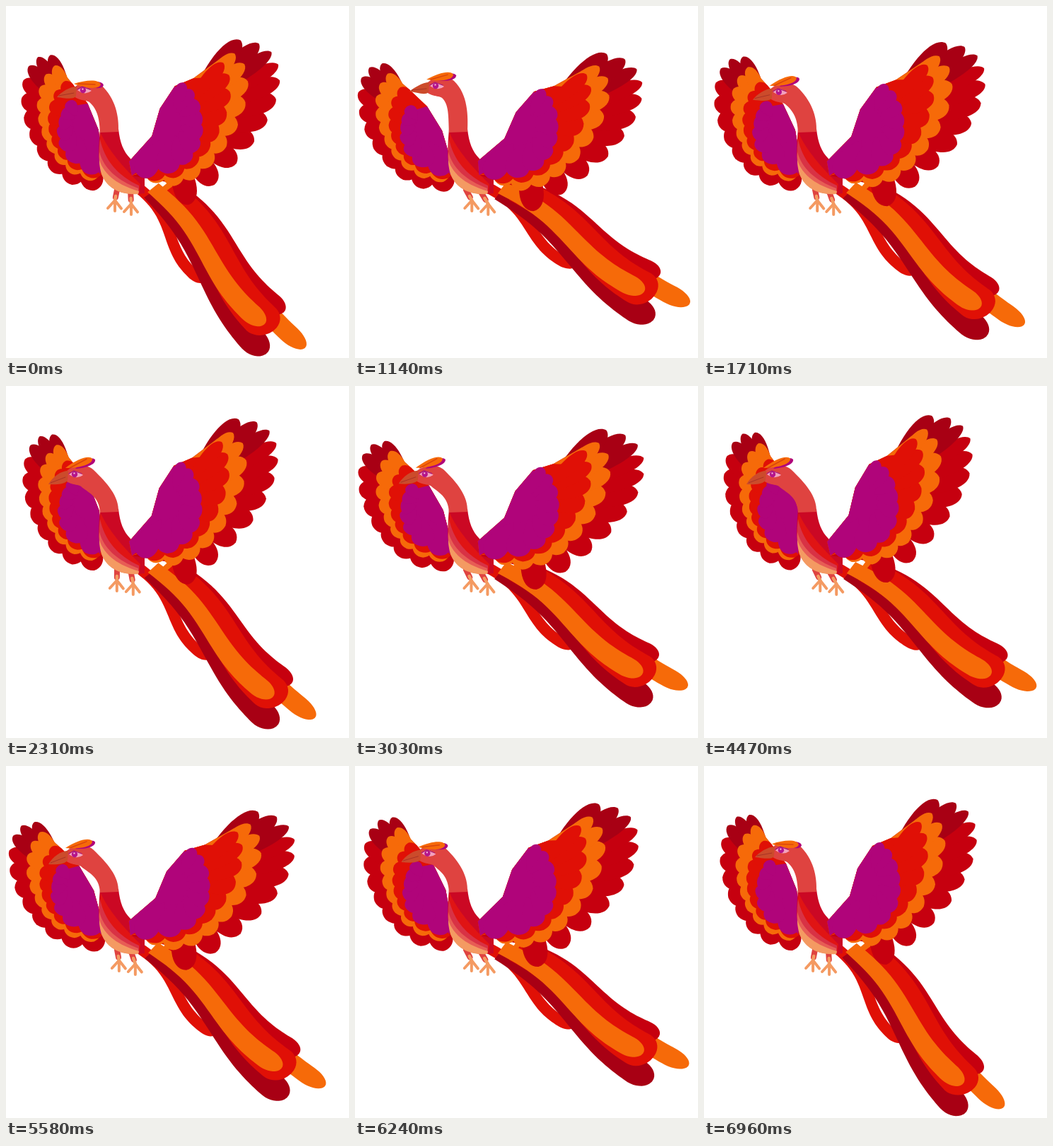
An HTML page with a canvas that plays this animation: 485 px wide and 498 px high, repeating every 6.99 s.

```html
<!DOCTYPE html>
<html lang="en">
<head>
<meta charset="utf-8">
<title>Firebird</title>
<style>
html, body { margin: 0; width: 100%; height: 100%; overflow: hidden; background: #fff; }
canvas { display: block; }
</style>
</head>
<body>
<canvas id="stage" width="485" height="498"></canvas>
<script>
const ctx = document.getElementById('stage').getContext('2d');
const LOOP = 6990, STEP = 30, TAU = Math.PI * 2;
const DARK = '#a80014', CRIMSON = '#c6000f', RED = '#e01006', ORANGE = '#f66a09', MAGENTA = '#b0047a';
const CORAL = '#df4340', PEACH = '#f49a62';

// Turning points of [time, value]; the bird eases from one to the next
const swingKeys = [[0, 56], [1140, 41], [2200, 53], [2890, 41], [3720, 57], [4550, 42], [5000, 52], [6450, 41]];
const nodKeys = [[0, .7], [1140, 1], [2310, 0], [3720, .2], [4470, 0], [5580, 0]];

function ease(keys, t) {
  const i = keys.findLastIndex(k => k[0] <= t);
  const [t0, a] = keys[i];
  const [t1, b] = keys[i + 1] || [LOOP, keys[0][1]];
  return a + (b - a) * (1 - Math.cos(Math.PI * (t - t0) / (t1 - t0))) / 2;
}

// Wing spread: about 0 raised, 1 lowered; three beats with a slow drift
function spread(t) {
  const wave = (beats, peak) => Math.cos(TAU * beats * (t - peak) / LOOP);
  return .35 + .5 * wave(3, 950) + .14 * wave(1, 900);
}

const mix = (a, b, s) => [a[0] + (b[0] - a[0]) * s, a[1] + (b[1] - a[1]) * s];

function bezier([a, b, c, d], s) {
  const ab = mix(a, b, s), bc = mix(b, c, s), cd = mix(c, d, s);
  return mix(mix(ab, bc, s), mix(bc, cd, s), s);
}

function shape(color, path) {
  ctx.fillStyle = color;
  ctx.fill(new Path2D(path));
}

function polygon(points, color) {
  ctx.beginPath();
  points.forEach(p => ctx.lineTo(p[0], p[1]));
  ctx.fillStyle = color;
  ctx.fill();
}

function line(color, width, ...points) {
  ctx.strokeStyle = color;
  ctx.lineWidth = width;
  ctx.beginPath();
  points.forEach(p => ctx.lineTo(p[0], p[1]));
  ctx.stroke();
}

function petal(root, tip, w, color) {
  const dx = tip[0] - root[0], dy = tip[1] - root[1], len = Math.hypot(dx, dy);
  const nx = -dy / len * w, ny = dx / len * w;
  const [mx, my] = mix(root, tip, .5), [ex, ey] = mix(root, tip, .96);
  ctx.beginPath();
  ctx.moveTo(root[0], root[1]);
  ctx.bezierCurveTo(mx + nx, my + ny, ex + nx, ey + ny, tip[0], tip[1]);
  ctx.bezierCurveTo(ex - nx, ey - ny, mx - nx, my - ny, root[0], root[1]);
  ctx.fillStyle = color;
  ctx.fill();
}

// Each layer: colour, feather count, leading-edge points used, curve along the feather tips
const rightWing = {
  pivot: [180, 220], mid: [232, 165], turn: .135,
  lead: [[178, 240], [174, 220], [206, 184], [217, 145], [238, 113], [264, 102], [300, 75]],
  layers: [
    [CRIMSON, 11, 7, [[330, 48], [430, 50], [388, 190], [258, 281]]],
    [ORANGE, 10, 7, [[322, 67], [378, 95], [297, 288], [208, 250]]],
    [RED, 9, 6, [[306, 80], [336, 114], [295, 254], [205, 247]]],
    [MAGENTA, 9, 5, [[250, 108], [284, 123], [308, 243], [190, 242]]]
  ]
};
const leftWing = {
  pivot: [135, 225], mid: [105, 165], turn: -.165,
  lead: [[133, 238], [136, 215], [131, 175], [116, 138], [95, 110], [76, 87]],
  layers: [
    [CRIMSON, 11, 6, [[64, 69], [-3, 60], [10, 250], [125, 261]]],
    [ORANGE, 10, 6, [[70, 84], [27, 111], [38, 232], [122, 247]]],
    [RED, 9, 5, [[84, 106], [47, 135], [46, 221], [128, 243]]],
    [MAGENTA, 7, 4, [[89, 134], [70, 155], [58, 212], [126, 238]]]
  ]
};

function wing({ pivot, mid, turn, lead, layers }, q) {
  const [px, py] = pivot, c = Math.max(0, Math.min(1, q));
  ctx.save();
  ctx.translate(px, py);
  ctx.scale(1 + .02 * q + .22 * c * (1 - c), 1);
  ctx.rotate(turn * q);
  ctx.translate(-px, -py);
  layers.forEach(([color, count, edge, curve], depth) => {
    const tips = Array.from({ length: count }, (_, i) => bezier(curve, i / (count - 1)));
    polygon([...lead.slice(0, edge), ...tips.map(p => mix(mid, p, .76))], color);
    for (let i = count - 1; i >= 0; i--) {
      const a = tips[Math.max(0, i - 1)], b = tips[Math.min(count - 1, i + 1)];
      const gap = Math.hypot(b[0] - a[0], b[1] - a[1]) / (i % (count - 1) ? 2 : 1);
      petal(mix(mid, tips[i], .3), tips[i], Math.min(gap, 30) * .74, depth === 0 && i < 3 ? DARK : color);
    }
  });
  ctx.restore();
}

// Base, half width at base and tip, length, angle from the swing, colour
const plumes = [
  { base: [226, 252], w0: 12, w1: 14, len: 306, turn: -9.5, color: ORANGE },
  { base: [238, 260], w0: 13, w1: 15, len: 249, turn: -12.5, color: CRIMSON },
  { base: [186, 256], w0: 8, w1: 8, len: 145, turn: 7, color: RED },
  { base: [205, 264], w0: 12, w1: 20, len: 278, turn: 0, color: DARK },
  { base: [229, 260], w0: 18, w1: 27, len: 258, turn: -6, color: RED },
  { base: [208, 257], w0: 10, w1: 15, len: 243, turn: -5, color: ORANGE }
];

function plume({ base, w0, w1, len, turn, color }, swing) {
  const a = (swing + turn) * Math.PI / 180, n = 40;
  const tip = [212 + len * Math.cos(a), 262 + len * Math.sin(a)];
  const dx = tip[0] - base[0], dy = tip[1] - base[1], reach = Math.hypot(dx, dy);
  const nx = dy / reach, ny = -dx / reach;
  const left = [], right = [];
  for (let i = 0; i <= n; i++) {
    const s = 1 - Math.pow(1 - i / n, 1.6);
    const cap = Math.max(0, (s - .9) / .1);
    const w = (w0 + (w1 - w0) * s) * Math.sqrt(Math.max(0, 1 - cap * cap));
    const bend = 7 * Math.sin(TAU * s);
    const [x, y] = mix(base, tip, s);
    left.push([x + nx * (bend - w), y + ny * (bend - w)]);
    right.unshift([x + nx * (bend + w), y + ny * (bend + w)]);
  }
  polygon([...left, ...right], color);
}

function leg(hx, hy, fx, fy) {
  const hip = [hx, hy], ankle = [fx, fy - 9];
  line(CORAL, 8, hip, mix(hip, ankle, .7));
  line(PEACH, 4.5, mix(hip, ankle, .6), ankle);
  [-10, 0, 9].forEach(x => line(PEACH, 4, ankle, [fx + x, fy + 6 - Math.abs(x) * .4]));
}

function body() {
  shape('#cb0824', 'M133 174 L159 174 C161 193 166 206 176 216 L196 240 L196 265 C166 270 143 256 135 236 C130 218 131 196 133 174Z');
  shape('#e01414', 'M134 180 C145 205 168 230 190 252 L188 265 C160 268 142 256 135 236 C130 218 132 196 134 180Z');
  shape('#d83245', 'M133 188 C139 218 158 240 188 254 L188 265 C160 268 142 256 135 236 C131 218 131 204 133 188Z');
  shape('#e75d55', 'M132 206 C138 230 158 247 187 258 L187 265 C160 267 142 256 135 236 C132 226 131 216 132 206Z');
  shape(PEACH, 'M132 218 C139 240 160 254 188 262 L187 266 C160 268 142 256 135 238 C133 231 132 225 132 218Z');
}

function head(t) {
  const nod = ease(nodKeys, t);
  const lift = 22 - 14 * Math.cos(Math.PI * t / LOOP) ** 6;
  const ex = 98 + 17 * nod, ey = 125 - 12 * nod * nod;
  const at = (x, y) => [ex + x, ey + y];
  const p = (x, y) => at(x, y).join(' ') + ' ';

  shape(CORAL, `M${p(-18, 4)}C${p(-10, 16)}${p(2, 13)}${p(8, 17)}` +
    `C${p(18, 26)}132 156 133 179 L159 178 C160 156 ${p(45, 12)}${p(25, -7)}` +
    `C${p(15, -16)}${p(-12, -14)}${p(-18, 4)}Z`);

  const drop = 14 - 6 * nod;
  shape('#cc4b2b', `M${p(-10, -5)}C${p(-20, -5)}${p(-32, 3)}${p(-38, drop)}` +
    `C${p(-28, drop + 1)}${p(-16, 14)}${p(-11, 9)}Z`);
  line('#a83325', 1, at(-35, drop - 2), at(-14, 4));

  petal(at(0, -8), at(28, 1 - lift), 6, MAGENTA);
  petal(at(-14, -9), at(24, -lift), 7, ORANGE);
  line('#d9430d', 1.5, at(-8, -9), at(16, -lift));

  shape('#f3a1bd', `M${p(-9, 0)}Q${p(-1, -9)}${p(11, 1)}Q${p(2, 8)}${p(-9, 0)}Z`);
  ctx.fillStyle = '#b4158c';
  ctx.beginPath();
  ctx.arc(ex - 1, ey, 4.2, 0, TAU);
  ctx.fill();
  ctx.fillStyle = '#f7c3dc';
  ctx.fillRect(ex - 2.5, ey - 2.5, 2, 2);
  line('#a61478', 1.2, at(-9, -1), at(-2, -5), at(9, -1));
}

function draw(t) {
  const q = spread(t), swing = ease(swingKeys, t);
  const sway = (56 - swing) * .75;
  ctx.fillStyle = '#fff';
  ctx.fillRect(0, 0, 485, 498);
  ctx.lineCap = ctx.lineJoin = 'round';
  plumes.forEach(p => plume(p, swing));
  wing(leftWing, q);
  leg(157, 260, 154 + sway, 284);
  leg(176, 260, 177 + sway, 289);
  body();
  wing(rightWing, q);
  head(t);
}

const start = performance.now();
function tick() {
  const t = (performance.now() - start) % LOOP;
  draw(Math.floor(t / STEP) * STEP);
  requestAnimationFrame(tick);
}
tick();
</script>
</body>
</html>
```
